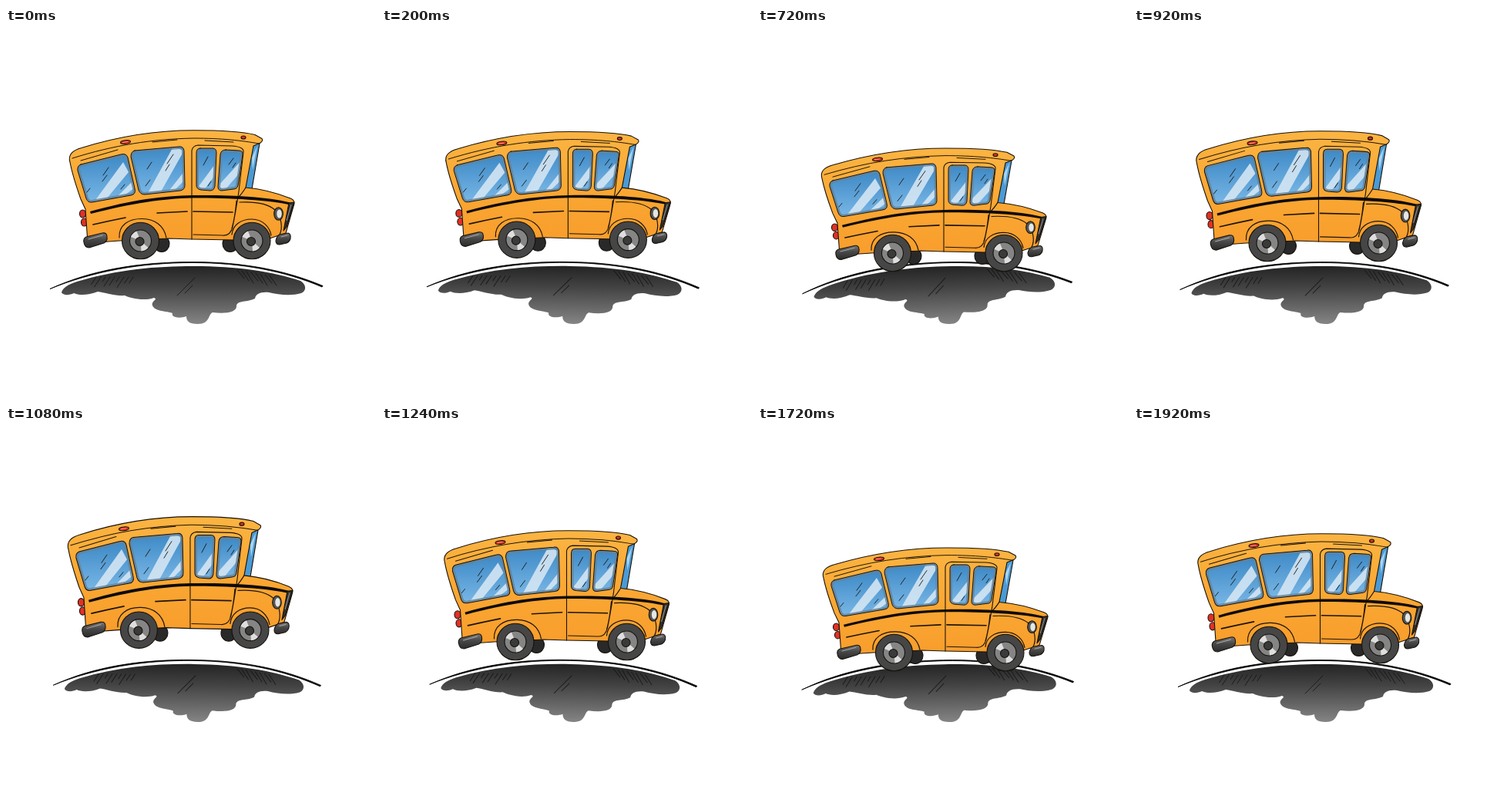
An HTML page for the animation above (1.96 s loop, 480x480 px).

```html
<!DOCTYPE html>
<html lang="en">
<head>
<meta charset="utf-8">
<title>Bouncing bus</title>
<style>
  html, body { margin: 0; width: 100%; height: 100%; overflow: hidden; background: #fff; }
  svg { display: block; width: 100%; height: 100%; }
  .ink { fill: none; stroke: #1c140b; stroke-width: 1.2; stroke-linecap: round; stroke-linejoin: round; }
  .edge { stroke: #17110a; stroke-width: 1.1; stroke-linejoin: round; }
</style>
</head>
<body>
<svg viewBox="0 0 480 480">
  <defs>
    <linearGradient id="paint" x1="0" y1="0" x2="0" y2="1">
      <stop offset="0" stop-color="#fbb442"/>
      <stop offset=".5" stop-color="#faa833"/>
      <stop offset="1" stop-color="#f89d2c"/>
    </linearGradient>
    <linearGradient id="glass" x1="0" y1="0" x2="0" y2="1">
      <stop offset="0" stop-color="#3c88c5"/>
      <stop offset="1" stop-color="#79b7e6"/>
    </linearGradient>
    <linearGradient id="shade" gradientUnits="userSpaceOnUse" x1="0" y1="309" x2="0" y2="384">
      <stop offset="0" stop-color="#242424"/>
      <stop offset=".35" stop-color="#424242"/>
      <stop offset="1" stop-color="#858585"/>
    </linearGradient>
    <linearGradient id="chrome" x1="0" y1="0" x2="0" y2="1">
      <stop offset="0" stop-color="#777"/>
      <stop offset=".45" stop-color="#484848"/>
      <stop offset="1" stop-color="#2b2b2b"/>
    </linearGradient>
  </defs>

  <g id="ground">
    <path fill="url(#shade)" d="M72 343C74 337 80 333 92 329C145 313 195 309 243 309C300 309 346 316 382 328C390 333 390 341 383 344C370 348 353 346 341 343C330 342 324 345 323 351C313 356 301 353 299 360C300 369 285 371 268 369C262 371 265 384 249 384C237 384 234 380 234 374C226 377 214 376 216 370C209 367 193 368 190 360C188 354 198 352 192 350C178 355 160 350 154 347C142 348 128 343 119 342C107 347 94 347 88 344C82 347 74 347 72 343Z"/>
    <path d="M57 338.500C110 314 172 303.500 242 303.500C308 303.500 362 314 411 334.500L410 336C362 315.500 306 304.500 242 304.500C174 304.500 112 316 57 338.500Z" stroke="#000" stroke-width=".8"/>
    <path id="hatch" class="ink" style="stroke:#111;stroke-width:1;opacity:.75"/>
  </g>

  <g id="far" fill="#292929" class="edge">
    <ellipse cx="202" cy="280" rx="10" ry="10.500"/>
    <ellipse cx="291" cy="280" rx="10" ry="10.500"/>
  </g>

  <g id="body">
    <path class="edge" fill="#4b9ad4" d="M320 149L329 150L319 209L310 209Z"/>
    <path d="M326 153L320 184L319 168Z" fill="#a9d4ef"/>
    <g class="edge" fill="#e03126">
      <ellipse cx="99.500" cy="241" rx="4" ry="5"/>
      <ellipse cx="101.500" cy="252" rx="4" ry="5"/>
    </g>
    <path class="edge" fill="url(#paint)" d="M83 174C80 164 87 158.500 98 155.500C148 140 196 132.800 243 132.800C280 132.800 307 134.500 323 138.500L332 143.500Q334 146 330 149L321 153L311 207C334 209 354 215 369 221C374 223 375 226 373 231L363 266L342 273L295 275L241 274L211 273L147 276L106 279L103 235L97 222C91 205 86 190 83 174Z"/>
    <path class="ink" d="M86 169C140 152 190 144 243 143C280 143 306 146 328 150M97 172L145 158M190 148L222 145M258 146L295 148" style="stroke-width:1"/>
    <path class="ink" d="M241 274L241 159Q242 153 249 152L293 153Q309 154 308 161L302 212Q298 239 294 258Q291 270 281 269L243 268M299 224Q297 246 293 260" style="stroke-width:1.1"/>
    <path class="ink" d="M311 207Q306 215 302 219M303 226C322 225 340 228 349 236C358 245 359 260 355 268M147 272C146 256 159 247 177 247.500C193 248 205 256 208 272M293 268C294 256 304 248 319 248C333 248 342 258 344 269"/>
    <g id="panes"></g>
    <path fill="#0e0b08" d="M109 238C165 222.500 203 218 242 217C292 216.500 342 218.500 372 227.500L371 230C342 223 292 220.500 242 220.500C202 221.500 165 227 110 241Z"/>
    <path class="ink" d="M113 255C126 252 140 249 155 246M196 240L235 238M243 238L294 239" style="stroke-width:1.700"/>
    <g class="edge" fill="#e03126">
      <ellipse cx="155" cy="148" rx="6.500" ry="2.300" transform="rotate(-6 155 148)"/>
      <ellipse cx="308" cy="142" rx="3" ry="2"/>
    </g>
    <path fill="#ff9a86" d="M151 148L158 147V148L151 149Z"/>
    <path class="edge" fill="#303030" d="M367 227L374 226L364 258L360 263Z"/>
    <path d="M370 229L364 250" stroke="#9a9a9a" fill="none"/>
    <ellipse class="edge" cx="353.500" cy="241" rx="5.800" ry="8.300" fill="#555"/>
    <ellipse cx="354.500" cy="241" rx="3.200" ry="5.600" fill="#e4e8e4"/>
    <path class="edge" fill="url(#chrome)" d="M104 271L125 266Q131 265 131 271Q132 276 127 279L108 285Q102 285 101 278Q100 273 104 271Z"/>
    <path class="edge" fill="url(#chrome)" d="M355 268L366 266Q370 267 369 273Q368 277 364 279L355 281Q350 281 350 276Q351 270 355 268Z"/>
    <path d="M107 274L125 269M357 271L365 269" stroke="#aaa" fill="none" stroke-linecap="round"/>
  </g>

  <g id="wheels"></g>
</svg>

<script>
const LOOP = 1960, STEP = 40, AXLE = 275;
const $ = id => document.getElementById(id);

// time, drop, body stretch, sway, ground tilt, ground width
const poses = [
  [0, 0, 1, 0, 0, 1],
  [80, -6, 1, 0, .4, 1],
  [240, 1, .97, .5, .9, .998],
  [400, 12, .935, 1, 1, .997],
  [560, 18, .925, 1, -.7, .993],
  [720, 16, .95, 0, -1.9, .99],
  [920, 3, 1.014, -1.5, -.3, .985],
  [1040, -12, 1.03, -2, .5, .982],
  [1120, -8, 1.02, -2, .8, .98],
  [1240, 4, 1.007, -1.5, 1, .98],
  [1400, 14, .955, .5, .8, .987],
  [1560, 19, .935, 1.5, -.5, .993],
  [1720, 18, .95, 2, -1.1, .997],
  [1920, 8, 1.007, .5, 0, 1]
];

function poseRow(i) {
  const n = poses.length, turn = Math.floor(i / n), row = poses[i - turn * n];
  return [row[0] + turn * LOOP, ...row.slice(1)];
}

// Smooth curve through the poses, closed over the loop
function poseAt(t) {
  let i = poses.length - 1;
  while (poses[i][0] > t) i--;
  const [a, b, c, d] = [-1, 0, 1, 2].map(k => poseRow(i + k));
  const span = c[0] - b[0], u = (t - b[0]) / span;
  return b.map((v, k) => {
    const m = (c[k] - a[k]) / (c[0] - a[0]) * span;
    const n = (d[k] - b[k]) / (d[0] - b[0]) * span;
    const e = c[k] - v;
    return v + u * (m + u * (3 * e - 2 * m - n + u * (m + n - 2 * e)));
  }).slice(1);
}

const panes = [
  { shape: 'M97 177L149 164Q156 162 158 168L167 208Q169 216 162 217L112 226Q106 227 104 221L93 185Q92 179 97 177Z',
    shine: 'M152 174L159 187L130 222L114 226ZM164 199L167 207L150 220L141 222Z',
    ticks: 'M126 191L133 181M125 199L131 191M105 213L109 208M149 209L154 203' },
  { shape: 'M167 159L224 154Q230 153 231 159L232 204Q232 210 226 211L180 216Q174 216 172 210L162 167Q162 160 167 159Z',
    shine: 'M217 154L231 159L200 214L183 216ZM232 185L233 196L217 212L210 213Z',
    ticks: 'M209 176L217 164M207 185L212 177M183 183L189 174M181 205L187 197' },
  { shape: 'M252 156L268 156Q273 156 273 162L271 205Q270 211 265 211L253 210Q247 209 247 204L247 162Q247 156 252 156Z',
    shine: 'M274 173L272 190L256 211L248 208Z',
    ticks: 'M256 178L262 167M262 205L266 199' },
  { shape: 'M285 158L302 159Q308 159 307 165L301 204Q300 209 295 209L280 211Q275 211 275 206L278 164Q279 158 285 158Z',
    shine: 'M307 170L304 187L284 210L275 205Z',
    ticks: 'M289 177L295 169M294 181L298 175' }
];
$('panes').innerHTML = panes.map((p, i) => `
  <clipPath id="pane${i}"><path d="${p.shape}"/></clipPath>
  <path d="${p.shape}" fill="url(#glass)"/>
  <g clip-path="url(#pane${i})">
    <path d="${p.shine}" fill="#d6e8f4" opacity=".88"/>
    <path d="${p.shape}" fill="none" stroke="#648399" stroke-width="6" opacity=".85"/>
  </g>
  <path class="ink" d="${p.ticks}" style="stroke-width:.9"/>
  <path class="ink" d="${p.shape}" style="stroke-width:1"/>`).join('');

const wheel = x => `
  <g transform="translate(${x} 276)">
    <ellipse class="edge" rx="24" ry="23.700" fill="#464646"/>
    <circle r="14" class="edge" fill="#858585"/>
    <path d="M0 0L-12.500 -5A13.500 13.500 0 0 1 -5 -12.500ZM0 0L10 9A13.500 13.500 0 0 1 1 13.500Z" fill="#dedede"/>
    <circle cx="-1" cy="1" r="5.500" class="edge" fill="#3a3a3a"/>
  </g>`;
$('wheels').innerHTML = wheel(174.5) + wheel(319);

const strokes = (x, y, count, gap, len) => Array.from({ length: count }, (_, i) => {
  const h = len * (.7 + .3 * Math.sin(i * 2.3));
  return `M${x + i * gap} ${y}l${-h * .65} ${h}`;
}).join('');
$('hatch').setAttribute('d',
  strokes(117, 323, 9, 6, 14) + 'M245 324L222 347M242 334L232 344' +
  Array.from({ length: 8 }, (_, i) => `M${300 + i * 6} ${314 + i}l9 ${11 + i % 3 * 2}`).join(''));

function draw(now) {
  const t = Math.floor(now % LOOP / STEP) * STEP;
  const [drop, stretch, sway, tilt, width] = poseAt(t);
  const move = `translate(${sway} ${drop})`;
  $('wheels').setAttribute('transform', move);
  $('far').setAttribute('transform', move);
  $('body').setAttribute('transform',
    `translate(${sway} ${AXLE + drop}) scale(1 ${stretch}) translate(0 ${-AXLE})`);
  $('ground').setAttribute('transform',
    `translate(250 385) rotate(${tilt}) scale(${width} 1) translate(-250 -385)`);
}

let start;
function tick(now) {
  start ??= now;
  draw(now - start);
  requestAnimationFrame(tick);
}
draw(0);
requestAnimationFrame(tick);
</script>
</body>
</html>
```
